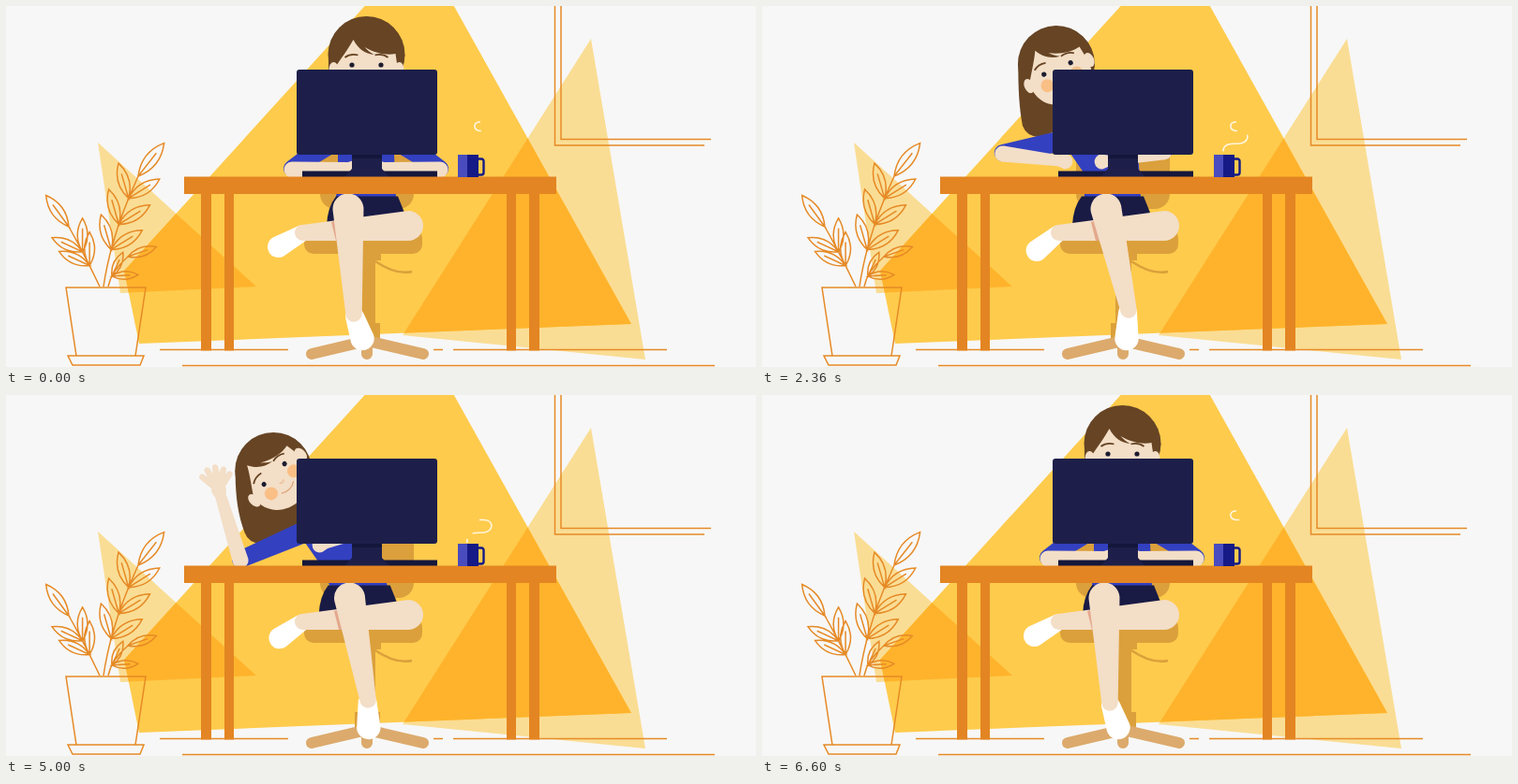
Animation of 800 by 386 pixels, one loop 6.64 s. Source, as an HTML page:

```html
<!DOCTYPE html>
<html lang="en">
<head>
<meta charset="utf-8">
<title>Working at a desk</title>
<style>
html, body { margin: 0; width: 100%; height: 100%; overflow: hidden; background: #f7f7f7; }
svg { display: block; width: 100vw; height: 100vh; }
.line { fill: none; stroke: #e68a26; stroke-width: 1.5; }
.skin { fill: #f3dec7; }
.hair { fill: #664424; }
.shirt { fill: #3340c0; }
.navy { fill: #1d1f4a; }
.desk { fill: #e38522; }
.chair { fill: #dba03b; }
.base { fill: none; stroke: #dcaa6c; stroke-width: 12; stroke-linecap: round; }
.cheek { fill: #f9bf85; }
.eye { fill: #1c1c30; }
.brow { fill: none; stroke: #664424; stroke-width: 1.8; }
.steam { fill: none; stroke: #fff6e0; stroke-width: 1.6; }
</style>
</head>
<body>
<svg viewBox="0 0 800 386" preserveAspectRatio="none">
  <defs>
    <path id="sun" d="M428-50L126 283L142 361L667 340L450-50Z"/>
    <path id="rays" d="M98 146L267 300L122 307ZM624 35L682 378L423 352Z"/>
    <clipPath id="overlap"><use href="#sun"/></clipPath>
  </defs>
  <use href="#rays" fill="#fadd94"/>
  <use href="#sun" fill="#fecb4c"/>
  <use href="#rays" fill="#ffb32c" clip-path="url(#overlap)"/>

  <path class="line" d="M585.500 0V149H745M592 0V142.500H752"/>
  <path class="line" d="M164 367.500H301M456 367.500H466M477 367.500H705M188 384.500H756"/>
  <path class="line" d="M64 301H149L138 374H75ZM66 374H147L143 384H71Z"/>
  <path class="line" id="plant"/>

  <rect class="chair" x="335" y="100" width="100" height="117" rx="16"/>
  <rect class="chair" x="318" y="238" width="126" height="27" rx="10"/>
  <path class="chair" d="M377 260H394V339H399V356H372V339H377ZM392 265H400V272H392Z"/>
  <path d="M394 273Q416 288 433 284" fill="none" stroke="#dba03b" stroke-width="2.500"/>
  <path class="base" d="M385 358L326 372M385 358L445 372M385 358V372"/>

  <path class="hair" id="locks"/>
  <g id="head">
    <circle class="hair" r="41"/>
    <g id="face">
      <ellipse class="skin" cx="-35" cy="5" rx="5" ry="8"/>
      <ellipse class="skin" cx="35" cy="5" rx="5" ry="8"/>
      <path class="skin" d="M-33 2C-28-6-20-16-14-27C-9-17-1-12 8-11C4-13 1-16-2-19C10-12 22-10 31-12L33 2C37 25 19 39 0 39C-19 39-37 25-33 2Z"/>
      <circle class="cheek" cx="-17" cy="12.500" r="7"/>
      <circle class="cheek" cx="17" cy="12.500" r="7"/>
      <circle class="eye" cx="-15.500" r="2.600"/>
      <circle class="eye" cx="15.500" r="2.600"/>
      <path class="brow" d="M-23-8Q-17-12.500-9-10.500M9-10.500Q17-12.500 23-8"/>
      <path d="M-3 11Q0 14 3 11" fill="none" stroke="#ecba92" stroke-width="1.300"/>
      <path id="mouth" fill="#fff" stroke="#e0a074"/>
    </g>
  </g>

  <path class="shirt" id="torso"/>
  <g id="armR"><path class="shirt"/><path class="skin"/></g>
  <g id="armL"><path class="shirt"/><path class="skin"/></g>

  <path id="skirt" fill="#191b45" d="M352 203.500Q343 215 342 234L400 242L425 221L418 203.500Z"/>
  <path id="shoeA" fill="#fff"/>
  <path class="skin" d="M316 234L429 219A16 16 0 0 1 429 251L317 251A8.500 8.500 0 0 1 316 234Z"/>
  <path id="shade" fill="#e3a88d" d="M347 231L353 229L360 251L352 251Z"/>
  <path id="shoeB" fill="#fff"/>
  <path class="skin" id="shin"/>

  <g class="navy">
    <path d="M369 155H401V183H369Z"/>
    <path fill="#15173b" d="M369 159H401V163H369ZM316 176.500H460V183H316Z"/>
    <path d="M369 174H401L409 183H361Z"/>
    <rect x="310" y="68" width="150" height="91" rx="3"/>
  </g>
  <path class="desk" d="M190 182.500H587V201H190ZM208 201H219V368.500H208ZM233 201H243V368.500H233ZM534 201H544V368.500H534ZM558 201H569V368.500H558Z"/>

  <rect x="482" y="159" width="11" height="24" fill="#484cbe"/>
  <rect x="492" y="159" width="12" height="24" fill="#151a86"/>
  <path d="M503 163.500H507Q509.500 163.500 509.500 166V178Q509.500 180.500 507 180.500H503" fill="none" stroke="#151a86" stroke-width="2.400"/>
  <path class="steam"/>
  <path class="steam"/>
</svg>
<script>
const LOOP = 6640, TAU = 2 * Math.PI;
const $ = id => document.getElementById(id);
const set = (el, name, value) => el.setAttribute(name, value);
const move = (id, x, y = 0, turn = 0) => set($(id), 'transform', `translate(${x} ${y})rotate(${turn})`);
const mix = (a, b, u) => a + (b - a) * u;
const ramp = (t, from, to) => Math.min(1, Math.max(0, (t - from) / (to - from)));
const ease = (t, from, to) => { const u = ramp(t, from, to); return u * u * (3 - 2 * u); };

// Rises over [a, b], holds, then falls over [c, d].
const hold = (t, a, b, c, d) => ease(t, a, b) - ease(t, c, d);

// Tapered capsule between two circles.
function limb(x1, y1, r1, x2, y2, r2) {
  const a = Math.atan2(y2 - y1, x2 - x1), nx = -Math.sin(a), ny = Math.cos(a);
  return `M${x1 + nx * r1} ${y1 + ny * r1}L${x2 + nx * r2} ${y2 + ny * r2}` +
    `A${r2} ${r2} 0 0 0 ${x2 - nx * r2} ${y2 - ny * r2}L${x1 - nx * r1} ${y1 - ny * r1}` +
    `A${r1} ${r1} 0 0 0 ${x1 + nx * r1} ${y1 + ny * r1}Z`;
}

function leaf(x, y, deg, len) {
  const a = deg * TAU / 360, dx = len * Math.cos(a), dy = len * Math.sin(a);
  const end = `${x + dx} ${y + dy}`, mx = x + dx / 2, my = y + dy / 2;
  return `M${x} ${y}Q${mx - dy * .3} ${my + dx * .3} ${end}Q${mx + dy * .3} ${my - dx * .3} ${x} ${y}` +
    `L${x + dx * .7} ${y + dy * .7}`;
}

// Curved stem with a leaf at its tip and pairs of leaves along it.
function sprig([x0, y0], [cx, cy], [x1, y1], pairs, len, tip, left, right) {
  let d = `M${x0} ${y0}Q${cx} ${cy} ${x1} ${y1}` + leaf(x1, y1, tip, len * 1.15);
  for (let i = 0; i < pairs; i++) {
    const u = .35 + .23 * i;
    const x = mix(mix(x0, cx, u), mix(cx, x1, u), u), y = mix(mix(y0, cy, u), mix(cy, y1, u), u);
    d += leaf(x, y, left, len) + leaf(x, y, right, len);
  }
  return d;
}
set($('plant'), 'd',
  sprig([104, 300], [112, 245], [141, 182], 3, 39, -52, -106, -32) +
  sprig([100, 300], [85, 268], [67, 236], 2, 36, -126, -155, -90) +
  sprig([109, 300], [112, 284], [130, 268], 1, 28, -19, -65, -3));

// Forearm and hand along +x; open = 0 is a fist, 1 spread fingers.
function forearm(open) {
  const wrist = 60 + 12 * open, palm = wrist + 7;
  let d = limb(0, 0, 8.5, wrist, 0, 6) + limb(wrist, 0, 6, palm, 0, 8);
  for (let i = 0; i < 5; i++) {
    const a = (22 * i - 36) * open * TAU / 360, len = (26 - 2 * Math.abs(i - 1.5)) * open;
    d += limb(palm, 0, 4, palm + len * Math.cos(a), len * Math.sin(a), 3.2);
  }
  return d;
}

function arm(el, sx, sy, ex, ey, angle, open) {
  const [sleeve, skin] = el.children;
  set(sleeve, 'd', limb(sx, sy, 11.5, ex, ey, 9));
  set(skin, 'd', forearm(open));
  set(skin, 'transform', `translate(${ex} ${ey + 1})rotate(${angle})`);
}

const steam = document.querySelectorAll('.steam');
steam.forEach(s => {
  set(s, 'd', 'M492 158C491 152 494 148 500 147.5L510 147C520 146 521 134 510 133.500L505 133.500C498 132 498 124 506 124');
  set(s, 'pathLength', 70);
});

function draw(t) {
  const lean = hold(t, 2000, 2720, 4920, 5560);
  const wave = hold(t, 3400, 3760, 4960, 5400);
  const smile = hold(t, 3300, 3600, 4700, 4960);
  const legs = hold(t, 1920, 2300, 4840, 5340);
  const lift = hold(t, 680, 1000, 5960, 6320) - .75 * Math.sin(ramp(t, 1000, 1680) * Math.PI) ** 2;
  const side = Math.sin(lean * TAU / 4), arc = Math.sin(lean * Math.PI);

  const x = mix(384.5, 285, side), y = mix(52 - 3 * lift, 83, lean ** 1.4);
  move('head', x, y, -47 * lean);
  move('face', 4 * smile - 2 * lean, 11 - 4 * lift - 4 * lean);
  const sway = 8 * lean * lean;
  set($('locks'), 'd', `M${x - 40.5} ${y}Q${x - 41} ${y + 40} ${x - 38 + sway} ${y + 66}` +
    `Q${x - 34 + sway} ${y + 77} ${x - 21 + sway} ${y + 78}L${x + 30} ${y + 62}L${x + 41} ${y}Z`);
  set($('mouth'), 'd', `M-9 20Q0 26 9 20Q0 ${26 + 17 * smile}-9 20Z`);
  set($('mouth'), 'stroke-width', 1.2 * (1 - smile));

  set($('torso'), 'd', `M${354 - 35 * side} 158L${354 - 22 * lean} 178L${352 - 8 * legs} 205` +
    `H${416 - 12 * legs}L${414 - 18 * side} 158Z`);
  const swing = t > 3620 && t < 5000 ? 5 - 5 * Math.cos((t - 3620) / 460 * TAU) : 0;
  const elbowX = mix(305, 250, 1 - (1 - lean) ** 3), elbowY = 174 - 10 * lean - 12 * arc + 14 * lean * wave;
  arm($('armL'), 340 - 22 * side, 150 - 3 * lean - 5 * arc, elbowX, elbowY,
    mix(-2 + 18 * lean, -110, wave) + swing, wave);
  arm($('armR'), 428 - 48 * lean, 150 - 20 * lean, 463 - 68 * lean, 174 - 38 * lean, 182 - 22 * lean, 0);

  move('skirt', -11 * legs);
  move('shade', 4 * legs);
  const ankleX = 371 + 20 * legs, ankleY = 329 - 4 * legs;
  set($('shin'), 'd', limb(365 + 2 * legs, 217, 16.5, ankleX, ankleY, 8.7));
  set($('shoeB'), 'd', limb(ankleX + 1 - 2 * legs, ankleY + 3, 10, 380 + 9 * legs, 355.5, 12.7));
  set($('shoeA'), 'd', limb(315, 243.5, 9, 290.5, 257.5, 11.5));
  set($('shoeA'), 'transform', `rotate(${4.5 * Math.cos(t / LOOP * 7 * TAU) - 4.5} 317 243)`);

  // Two wisps trace the same curve, one after the other.
  steam.forEach((s, i) => {
    const age = (t - 640 - 960 * i + LOOP) % (LOOP / 2);
    const front = 70 * ramp(age, 0, 1350), back = 70 * ease(age, 560, 2300);
    set(s, 'stroke-dasharray', `0 ${back} ${front - back} 100`);
    set(s, 'visibility', front - back > .1 ? 'visible' : 'hidden');
  });
}

const start = performance.now();
function tick() {
  draw((performance.now() - start) % LOOP);
  requestAnimationFrame(tick);
}
tick();
</script>
</body>
</html>
```
